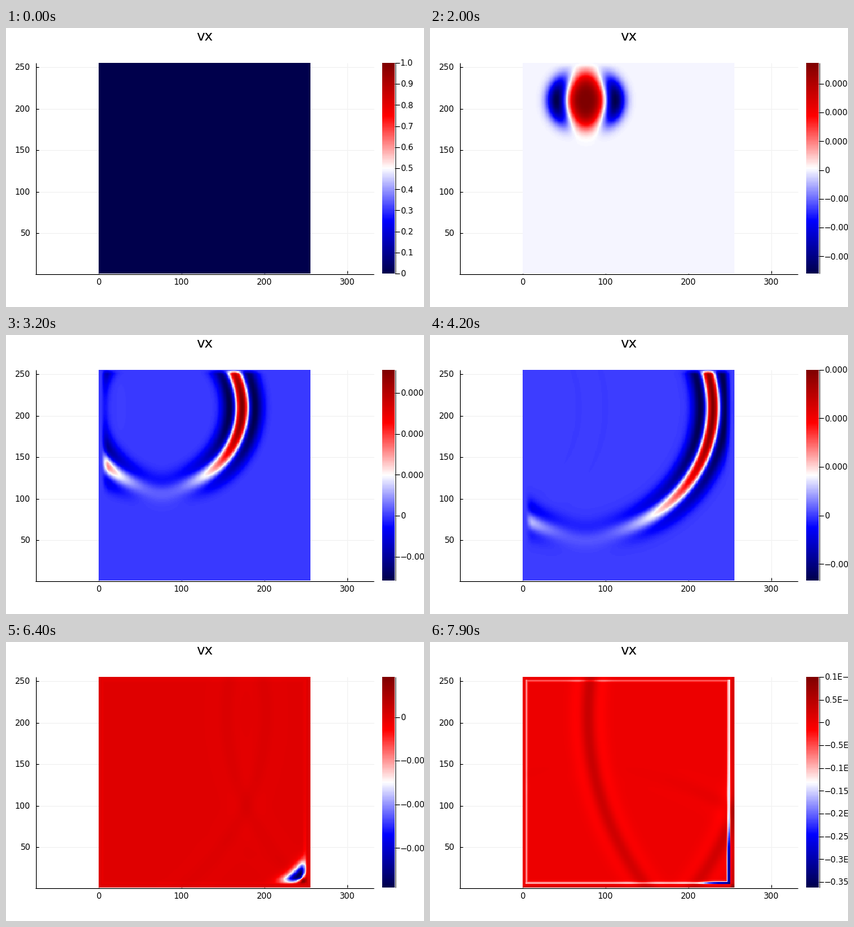
A matplotlib script that plays this animation: 600x400 px, repeating every 8000 ms.

```python
import math
import numpy as np
import matplotlib.pyplot as plt
from matplotlib.animation import FuncAnimation

plt.rcParams["font.family"] = "DejaVu Sans"

N = 256
FRAMES = 80
CX, CY = 77, 211
LABEL = 8.5
xs, ys = np.meshgrid(np.arange(N) + 1.0, np.arange(N) + 1.0)


def smooth(u):
    u = np.clip(u, 0, 1)
    return u * u * (3 - 2 * u)


def gauss(d, w):
    return np.exp(-(d / w) ** 2)


def hump(x, s, p):
    """Radial displacement x*exp(-|x/s|^p) and its slope."""
    q = np.abs(x / s) ** p
    e = np.exp(-q)
    return np.array([x * e, (1 - p * q) * e])


def polar(x0, y0):
    dx, dy = xs - x0, ys - y0
    r2 = np.maximum(dx * dx + dy * dy, 0.09)
    return np.sqrt(r2), dx * dx / r2


# the pulse and its mirror images in the right, left and bottom walls
direct = polar(CX, CY)
mirrors = [polar(504 - CX, CY), polar(8 - CX, CY), polar(CX, 8 - CY)]

# absorbing rim
taper = (smooth((xs - 3) / 10) * smooth((N - xs - 2) / 10)
         * smooth((ys - 3) / 10) * smooth((N + 1 - ys) / 6))


def rim_residue():
    inner = (xs > 3) & (xs < 252) & (ys > 4) & (ys < 254)
    right = -(1.25 + 2.4 / (1 + np.exp((ys - 70) / 15))) * gauss(xs - 250, 1.9)
    left = -0.85 * gauss(xs - 5, 1.7)
    floor = -(1.0 + 2.6 / (1 + np.exp((225 - xs) / 8))) * gauss(ys - 6, 1.9)
    top = -0.6 * gauss(ys - 252, 1.6)
    lines = np.minimum.reduce([right, left, floor, top]) * inner
    edge = 0.25 * ((xs > 253) | (ys < 3))
    corner = 0.75 * gauss(xs - 255, 3) * gauss(ys - 1, 3)
    return (lines + edge + corner) * 1e-6


residue = rim_residue()


def front(n):
    m = n - 32
    return 97 + 5.75 * m - (0.009 * m * m if m > 0 else 0)


def wave(n, place):
    r, cos2 = place
    if n < 20:
        v = (n - 3) / 17
        b, p = 4 + 29 * v ** 1.2, 2 + 1.5 * v
        a = smooth((n - 8) / 8)
        disp, slope = a * hump(r, b, p) - (1 - a) * hump(r, 1.3 * b, p)
        amp = 7.45e-4 * math.exp(-((20 - n) / 6) ** 2)
    else:
        u = min((n - 20) / 8, 1)
        e = smooth(u)
        far = front(n)
        rad = far * math.sin(math.pi / 2 * u)
        s, p = 33 - 20.3 * e, 3.5 - 1.5 * e
        disp, slope = hump(r - rad, s, p) + hump(r + rad, s, p)
        amp = 3.56e-4 * (97 / far) ** 0.37 * (1 + 0.32 * (1 - u))
        amp *= min(1, 1 - 0.015 * (n - 52))
        amp /= 1 + math.exp(-(rad / s) ** 2)
    return amp * (cos2 * slope + (1 - cos2) * disp / r)


def field(n):
    if n < 3:
        return np.zeros((N, N))
    f = wave(n, direct) * taper
    if n >= 28:
        f += 0.0025 * sum(wave(n, m) for m in mirrors)
        f += residue * smooth((n - 40) / 35)
        above = smooth((ys - CY + 70) / 40)
        f += 5e-6 * math.exp(-((n - 50) / 5) ** 2) * gauss(xs - 247, 3) * above
        f -= 8e-6 * math.exp(-((n - 31) / 5) ** 2) * gauss(xs - 8, 4) * above
    return f


def tick_step(span, need):
    k = math.floor(math.log10(span))
    for e in (k, k - 1, k - 2):
        for m in (5, 2, 1):
            if span / (m * 10.0 ** e) >= need:
                return m * 10.0 ** e


def tick_text(v, step, small):
    if abs(v) < step / 2:
        return "0"
    if small:
        mant, ex = f"{abs(v):.3e}".split("e")
        s = f"{float(mant) / 10:g}E{int(ex) + 1}"
    elif step >= 0.1:
        s = f"{abs(v):.1f}"
    else:
        s = f"{abs(v):.6f}".rstrip("0")
    return ("-" * int(v < 0) + s).replace("-", "\u2212")


fig = plt.figure(figsize=(6, 4), dpi=100, facecolor="white")
ax = fig.add_axes([0, 0, 1, 1])
ax.axis("off")


def line(x, y, w=0.72, color="black", z=3):
    return ax.plot(x, y, color=color, lw=w, zorder=z,
                   solid_capstyle="butt")[0]


def label(x, y, s, ha, size=LABEL):
    return ax.text(x, y, s, ha=ha, va="baseline", fontsize=size, color="black")


for v in (0, 100, 200, 300):
    x = 132.5 + 1.19 * v
    line([x, x], [50, 352], color="#f1f1f1", z=0)
    line([x, x], [348, 352], z=1)
    label(x, 368.3, str(v), "center")
for v in (50, 100, 150, 200, 250):
    y = 353.5 - 1.19 * v
    line([43, 528], [y, y], color="#f1f1f1", z=0)
    line([43, 47], [y, y], z=1)
    label(34.8, y + 4.3, str(v), "right")
line([42.5, 42.5], [50, 353])
line([42, 528], [352.5, 352.5])
label(285.5, 18.3, "vx", "center", 14.5)

heat = ax.imshow(np.zeros((N, N)), cmap="seismic", vmin=0, vmax=1,
                 origin="lower", extent=(133, 437, 352, 50), aspect="auto",
                 interpolation="nearest", zorder=2)
ax.imshow(np.linspace(0, 1, 256)[:, None], cmap="seismic", origin="lower",
          extent=(540, 558, 352, 50), aspect="auto",
          interpolation="nearest", zorder=2)
line([558.5, 558.5], [50, 352], 0.6)
ax.set_xlim(0, 600)
ax.set_ylim(400, 0)

bar_marks = []


def update(n):
    while bar_marks:
        bar_marks.pop().remove()
    f = field(n)
    lo, hi = (f.min(), f.max()) if n >= 3 else (0.0, 1.0)
    heat.set_data(f)
    heat.set_clim(lo, hi)
    small = max(-lo, hi) < 1e-5
    span = hi - lo
    step = tick_step(span, 9 if small or n < 3 else 4)
    first = math.ceil(lo / step - 0.01)
    last = math.floor(hi / step + 0.01)
    for k in range(first, last + 1):
        y = 352 - 302 * (k * step - lo) / span
        bar_marks.append(line([558, 565], [y, y]))
        bar_marks.append(label(566, y + 4.3, tick_text(k * step, step, small),
                               "left"))
    return [heat] + bar_marks


anim = FuncAnimation(fig, update, frames=FRAMES, interval=100,
                     init_func=lambda: update(0), repeat=True,
                     repeat_delay=0, blit=False)
plt.show()
```
